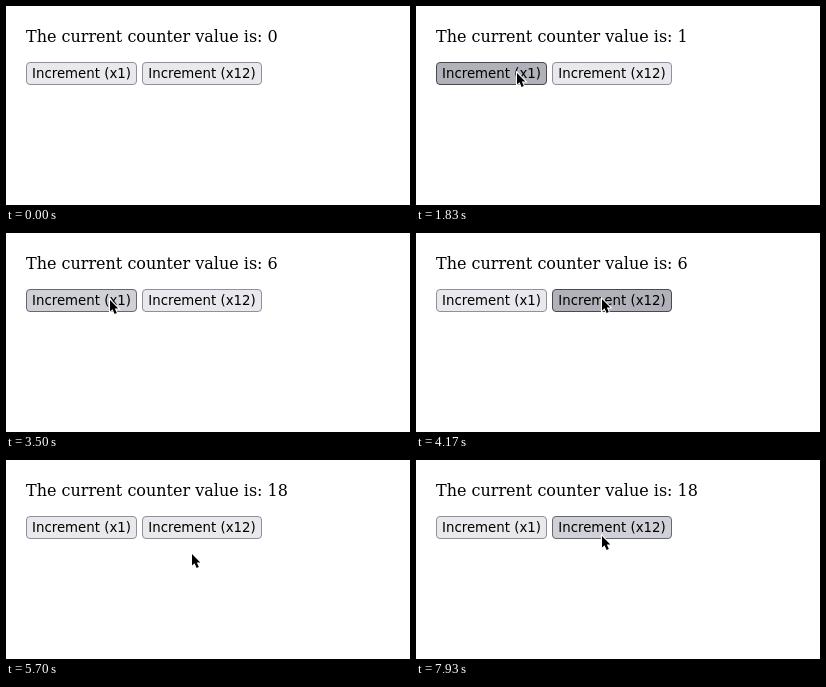
An HTML page for the animation above (8 s loop, 404 px wide and 199 px high).

```html
<!DOCTYPE html>
<html lang="en">
<head>
<meta charset="utf-8">
<title>Counter</title>
<style>
  html, body { margin: 0; width: 100%; height: 100%; overflow: hidden; background: #fff; color: #000; }
  p, .button, svg { position: absolute; margin: 0; white-space: pre; }
  p { left: 20px; top: 21px; font: 16px/19px "DejaVu Serif", serif; }
  .button {
    top: 56px; height: 23px; box-sizing: border-box; text-align: center;
    font: 13.333px/21px "DejaVu Sans", sans-serif;
    background: #e9e9ed; border: 1px solid #8f8f9d; border-radius: 4px;
  }
  .hover { background: #d0d0d7; border-color: #676774; }
  .active { background: #b1b1b9; border-color: #484851; }
  #one { left: 20px; width: 111px; }
  #twelve { left: 136px; width: 120px; }
  svg { left: 0; top: 0; overflow: visible; }
</style>
</head>
<body>
<p>The current counter value is: <span id="value">0</span></p>
<div class="button" id="one">Increment (x1)</div>
<div class="button" id="twelve">Increment (x12)</div>
<svg id="cursor" width="12" height="18">
  <path d="M0 0V11.6L2.6 9.2L4.6 14L6.8 13.1L4.8 8.4H8.3Z" stroke="#fff" stroke-width="2" paint-order="stroke"/>
</svg>
<script>
const LOOP = 8000;
const [value, one, twelve, cursor] =
  ['value', 'one', 'twelve', 'cursor'].map(id => document.getElementById(id));

// Each click is [press, release].
const singleClicks = [[1530, 1630], [1830, 1940], [2130, 2200], [2370, 2470], [2670, 2800], [2970, 3040]];
const burstClick = [4170, 4260];
const burstInterval = 101;

const easeOut = u => 1 - (1 - u) ** 2;
const easeInOut = u => u * u * (3 - 2 * u);

// Cursor moves: start, end, target x, target y, easing.
const moves = [
  [470, 970, 101, 68, easeOut],
  [1229, 1230, 101, 67, easeInOut],
  [3465, 3770, 186, 66, easeInOut],
  [5480, 5700, 186, 94, easeInOut],
  [7635, 7930, 186, 76, easeInOut],
];

function cursorAt(t) {
  let x = 93, y = 199;
  for (const [start, end, toX, toY, ease] of moves) {
    if (t < start) break;
    const k = ease(Math.min(1, (t - start) / (end - start)));
    x += (toX - x) * k;
    y += (toY - y) * k;
  }
  return [Math.round(x), Math.round(y)];
}

function countAt(t) {
  const singles = singleClicks.filter(([, release]) => t >= release).length;
  const burst = Math.floor((t - burstClick[1]) / burstInterval) + 1;
  return singles + Math.max(0, Math.min(12, burst));
}

function paintButton(button, clicks, left, right, t, [x, y]) {
  const hover = t >= 500 && x >= left && x < right && y >= 56 && y < 79;
  const active = clicks.some(([press, release]) => t >= press && t < release);
  button.className = 'button' + (active ? ' active' : hover ? ' hover' : '');
}

function draw() {
  const t = performance.now() % LOOP;
  const pos = cursorAt(t);
  value.textContent = countAt(t);
  paintButton(one, singleClicks, 20, 131, t, pos);
  paintButton(twelve, [burstClick], 136, 256, t, pos);
  cursor.style.visibility = t < 500 ? 'hidden' : 'visible';
  cursor.style.transform = `translate(${pos[0]}px, ${pos[1]}px)`;
  requestAnimationFrame(draw);
}
draw();
</script>
</body>
</html>
```
